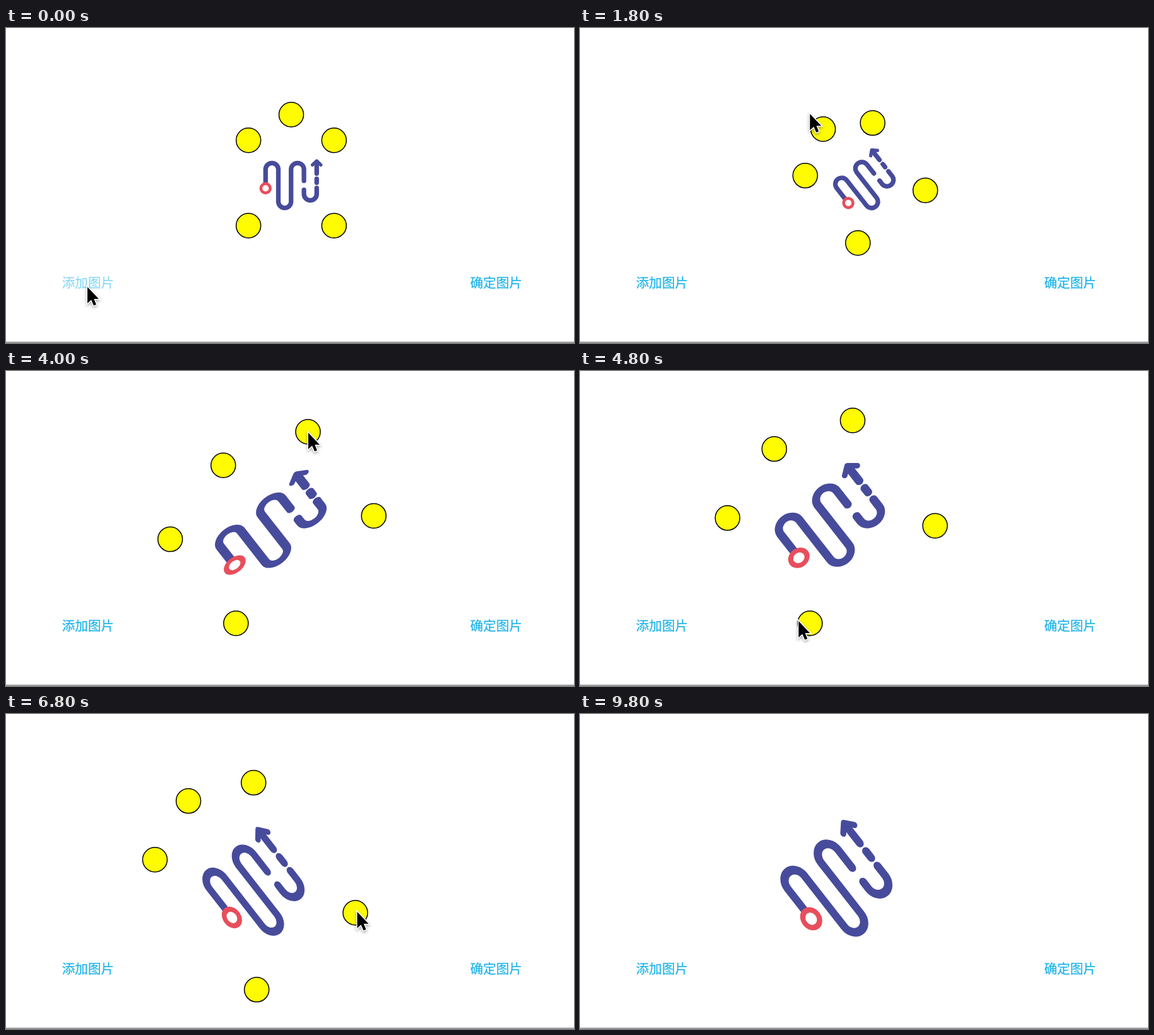
Write an HTML page that moves like this. It is 900 px wide and 500 px high and loops after 10000 ms.

```html
<!DOCTYPE html>
<html lang="zh">
<head>
<meta charset="utf-8">
<style>
  html, body { margin: 0; width: 100%; height: 100%; overflow: hidden; background: #fff; }
  svg { display: block; width: 900px; height: 500px; }
  text { font: 20.6px "Noto Sans CJK SC", "Noto Sans CJK", sans-serif; text-anchor: middle;
         fill: #1fb4ea; stroke: #1fb4ea; stroke-width: .25; }
  #icon path { fill: none; stroke: #474b9b; stroke-width: 7.3; stroke-linecap: round; stroke-linejoin: round; }
  #handles circle { fill: #fffb00; stroke: #000; stroke-width: 1.5; }
  #cursor { filter: drop-shadow(0 2px 2px rgba(0, 0, 0, .35)); }
</style>
</head>
<body>
<svg viewBox="0 0 900 500">
  <rect y="498" width="900" height="1.5" fill="#777"/>
  <text id="add" x="129.9" y="412">添加图片</text>
  <text id="confirm" x="776.7" y="412">确定图片</text>
  <g id="icon">
    <path d="M-40.7 2V-21.5a10.1 10.1 0 0 1 20.2 0V29.5a10.1 10.1 0 0 0 20.2 0V-21.5a10.1 10.1 0 0 1 20.4 0V-3.5"/>
    <path d="M20.1 11V17.5a10.1 10.1 0 0 0 20.2 0V8M40.3-.5V-6.5M40.3-15V-33"/>
    <path d="M33.5-28.7L40.3-35L47-28.7" style="stroke-width:5.2"/>
    <circle cx="-40.7" cy="8.5" r="7.4" fill="#fff" stroke="#e84e5b" stroke-width="4.6"/>
  </g>
  <g id="handles">
    <circle r="19.5"/><circle r="19.5"/><circle r="19.5"/><circle r="19.5"/><circle r="19.5"/>
  </g>
  <path id="cursor" d="M0 0V26L6 20.5L10 29.5L14 28L10.3 19H18Z"
        stroke="#fff" stroke-width="3" paint-order="stroke"/>
</svg>
<script>
const LOOP = 10000, STEP = 100, SIZE = 135.6, STALK = 40.7;
const $ = id => document.getElementById(id);
const handles = [...$('handles').children];

// A grip is a position on the box in half sizes, plus a stalk length above it.
const turn = [0, -1, STALK], middle = [0, 0, 0];
const topLeft = [-1, -1, 0], topRight = [1, -1, 0], bottomLeft = [-1, 1, 0], bottomRight = [1, 1, 0];
const grips = [topLeft, topRight, bottomLeft, bottomRight, turn];

// Pointer drags: start and time per leg in seconds, pointer offset from the grip, pointer stops.
const drags = [
  { grip: turn, start: 1.15, leg: .6, offset: [0, -11.5], stops: [[364.5, 134]] },
  { grip: topLeft, start: 2.3, leg: .35, offset: [.5, -3.5], stops: [[207.5, 211.5], [227, 222], [225, 218]] },
  { grip: topRight, start: 3.65, leg: .35, offset: [.5, 1.5], stops: [[479, 98], [432.5, 80]] },
  { grip: bottomLeft, start: 4.8, leg: .35, offset: [-18, -3.5], stops: [[377, 413.5], [399, 398]] },
  { grip: middle, start: 5.85, leg: .35, offset: [0, 0], stops: [[394.5, 263]] },
  { grip: bottomRight, start: 6.35, leg: .45, offset: [3, -1.5], stops: [[556.5, 314], [585, 307]] }
];

const add = (a, b) => [a[0] + b[0], a[1] + b[1]];
const sub = (a, b) => [a[0] - b[0], a[1] - b[1]];
const mix = (a, b, p) => [a[0] + (b[0] - a[0]) * p, a[1] + (b[1] - a[1]) * p];
const rotate = ([x, y], a) =>
  [x * Math.cos(a) - y * Math.sin(a), x * Math.sin(a) + y * Math.cos(a)];
const ease = (t, from, to) => {
  const p = Math.min(1, Math.max(0, (t - from) / (to - from)));
  return p * p * (3 - 2 * p);
};

const gripPoint = (box, [gx, gy, stalk]) =>
  add(box.center, rotate([gx * box.w / 2, gy * box.h / 2 - stalk], box.angle));

// Turning follows the pointer's direction; a corner stretches the box away from the opposite one.
function drag(box, { grip, offset }, pointer) {
  if (grip === turn) {
    const [dx, dy] = sub(pointer, box.center);
    return { ...box, angle: Math.atan2(dx, -dy) };
  }
  const point = sub(pointer, offset);
  if (grip === middle) return { ...box, center: point };
  const [gx, gy] = grip;
  const anchor = gripPoint(box, [-gx, -gy, 0]);
  const [dx, dy] = rotate(sub(point, anchor), -box.angle);
  return { ...box, center: mix(anchor, point, .5), w: gx * dx, h: gy * dy };
}

function pose(t) {
  let box = { center: [452, 246], w: SIZE, h: SIZE, angle: 0 };
  let pointer = [129, 411], free = .2;
  for (const d of drags) {
    const grab = add(gripPoint(box, d.grip), d.offset);
    pointer = mix(pointer, grab, ease(t, free, d.start));
    if (t < d.start) return { box, pointer };
    d.stops.forEach((stop, i) => {
      const from = d.start + i * d.leg;
      pointer = mix(pointer, stop, ease(t, from, from + d.leg));
    });
    box = drag(box, d, pointer);
    free = d.start + d.leg * d.stops.length;
  }
  pointer = mix(pointer, [774, 410], ease(t, free, 8));
  pointer = mix(pointer, [740, 445], ease(t, 8.5, 9.1));
  return { box, pointer };
}

function draw(now) {
  const t = Math.floor(now % LOOP / STEP) * STEP / 1000;
  const { box, pointer } = pose(t);

  $('icon').setAttribute('transform', `translate(${box.center})
    rotate(${box.angle * 180 / Math.PI}) scale(${box.w / SIZE} ${box.h / SIZE})`);
  grips.forEach((grip, i) =>
    handles[i].setAttribute('transform', `translate(${gripPoint(box, grip)})`));
  $('handles').style.display = t < 8.2 ? '' : 'none';
  $('cursor').setAttribute('transform', `translate(${pointer})`);
  $('cursor').style.display = t < 9.2 ? '' : 'none';
  $('add').style.opacity = t < .2 ? .5 : 1;
  $('confirm').style.opacity = t >= 8.1 && t < 8.3 ? .5 : 1;
}

const start = performance.now();
function tick() {
  draw(performance.now() - start);
  requestAnimationFrame(tick);
}
tick();
</script>
</body>
</html>
```
